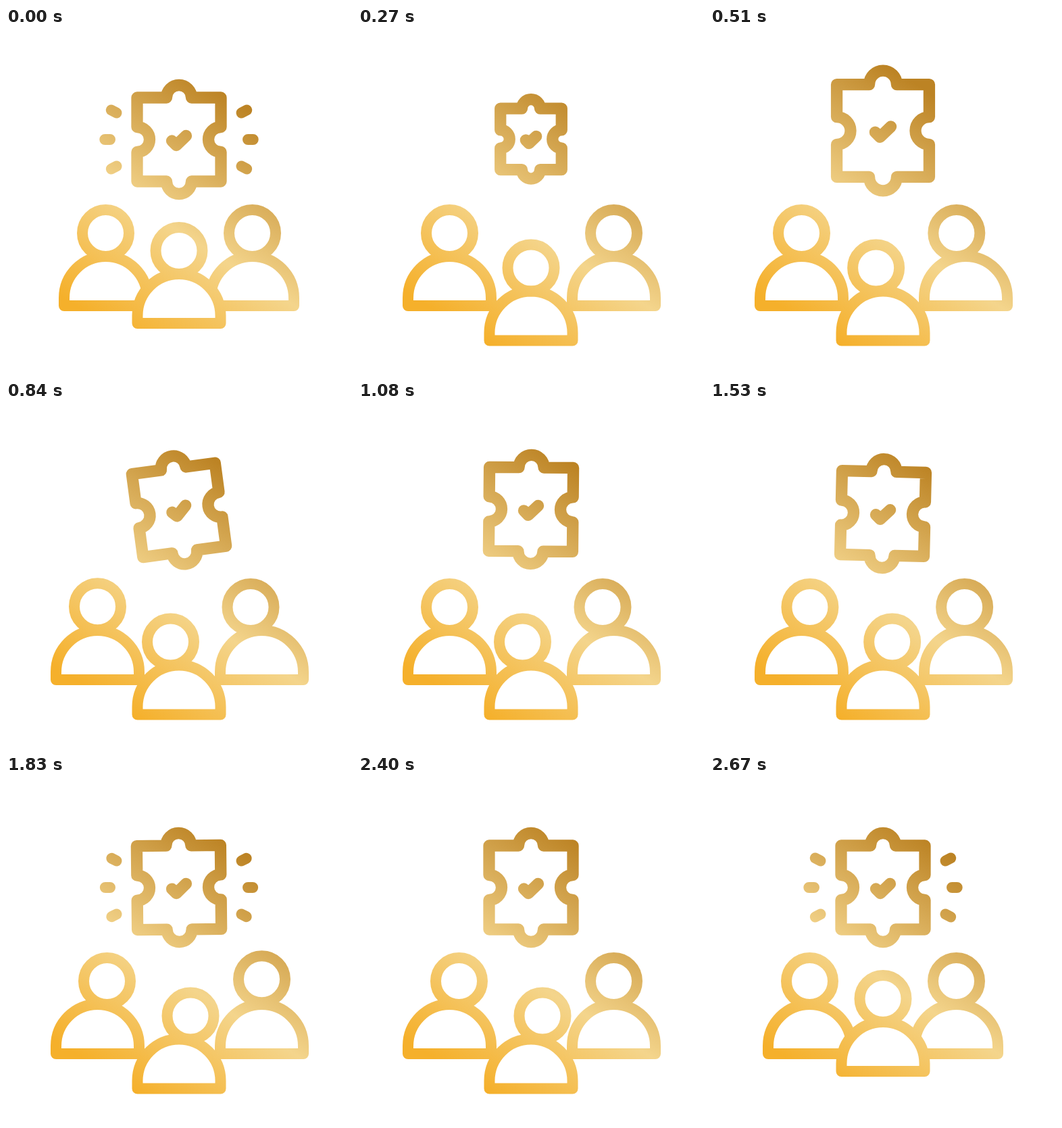
Recreate the animation shown at these times as an HTML page with a canvas. Size 512 px wide and 512 px high, loop 2700 ms.

```html
<!DOCTYPE html>
<html>
<head>
<meta charset="utf-8">
<style>
html, body { margin: 0; height: 100%; overflow: hidden; background: #fff; }
canvas { display: block; }
</style>
</head>
<body>
<canvas id="stage" width="512" height="512"></canvas>
<script>
const LOOP = 2700;
const ctx = document.getElementById('stage').getContext('2d');
ctx.lineCap = ctx.lineJoin = 'round';

const gold = ctx.createLinearGradient(141, 435, 349, 112);
gold.addColorStop(0, '#f5b02b');
gold.addColorStop(0.455, '#f4d58c');
gold.addColorStop(1, '#bc8324');

const body = new Path2D('M-61.5 73V61.5A61.5 61.5 0 0 1 61.5 61.5V73Z');
const head = new Path2D();
head.arc(0, 0, 34.5, 0, 7);
const puzzle = new Path2D(`M-62-62H-18.5A18.5 18.5 0 0 1 18.5-62H62V-18.5
  A18.5 18.5 0 0 0 62 18.5V62H18.5A18.5 18.5 0 0 1-18.5 62H-62V18.5
  A18.5 18.5 0 0 0-62-18.5Z M-10.5 2L-4 8.5L10.5-5.5`);

const clamp = (v, low, high) => Math.min(high, Math.max(low, v));

// Smooth rise from 0 to 1
function ramp(t, start, end) {
  const p = clamp((t - start) / (end - start), 0, 1);
  return p * p * (3 - 2 * p);
}

// Smooth bump that peaks at 1
const pulse = (t, peak, half) =>
  Math.cos(Math.PI / 2 * clamp((t - peak) / half, -1, 1)) ** 2;

// Paths are placed first so that stroke width and gradient stay in stage space
function draw(shape, x, y, { scale = 1, angle = 0, width = 16, fill = false } = {}) {
  const path = new Path2D();
  path.addPath(shape, new DOMMatrix().translate(x, y).rotate(angle).scale(scale));
  if (fill) ctx.fill(path);
  ctx.lineWidth = width;
  ctx.stroke(path);
}

function person(x, y, turn, nod = 0) {
  draw(body, x, y, { fill: true });
  draw(head, x + turn, y - 34.5 - nod);
}

function rays(grow) {
  if (grow < 0.01) return;
  const path = new Path2D();
  for (const side of [-1, 1])
    for (const row of [-1, 0, 1]) {
      const x = row ? 92.5 : 102;
      path.moveTo(side * x, row * 39.5);
      path.lineTo(side * (x + 7.7 * grow), row * (39.5 + 4 * grow));
    }
  draw(path, 256, 165, { width: 16 * Math.min(1, grow * 3) });
}

function render(t) {
  ctx.fillStyle = '#fff';
  ctx.fillRect(0, 0, 512, 512);
  ctx.strokeStyle = gold;

  const gather = ramp(t, 2410, 2660);
  const turnBack = ramp(t, 1120, 1640);
  const apart = ramp(t, 20, 270) - gather;
  const lookLeft = ramp(t, 290, 590) - turnBack;
  const lookRight = turnBack - gather;

  person(147.5 - 12 * apart, 338, 14 * lookRight, 3 * pulse(t, 735, 165));
  person(364.5 + 14 * apart, 338, -16.5 * lookLeft, 2.7 * pulse(t, 1835, 165));
  person(256, 364 + 25.5 * apart, 17 * lookRight - 12.5 * lookLeft);

  const lift = 14 * pulse(t, 470, 230) + 6.5 * pulse(t, 1000, 520);
  const swing = Math.sin(2 * Math.PI * Math.max(0, t - 570) / 1000);
  draw(puzzle, 256, 165 - lift, {
    scale: 1 - 0.27 * pulse(t, 270, 200) + 0.12 * pulse(t, 470, 170),
    angle: -7.7 * swing * (1 - ramp(t, 1320, 1935)),
    width: 17.3
  });
  rays(1 - ramp(t, 20, 210) + pulse(t, 1870, 230) + gather);
}

function frame(now) {
  render(now % LOOP);
  requestAnimationFrame(frame);
}
requestAnimationFrame(frame);
</script>
</body>
</html>
```
